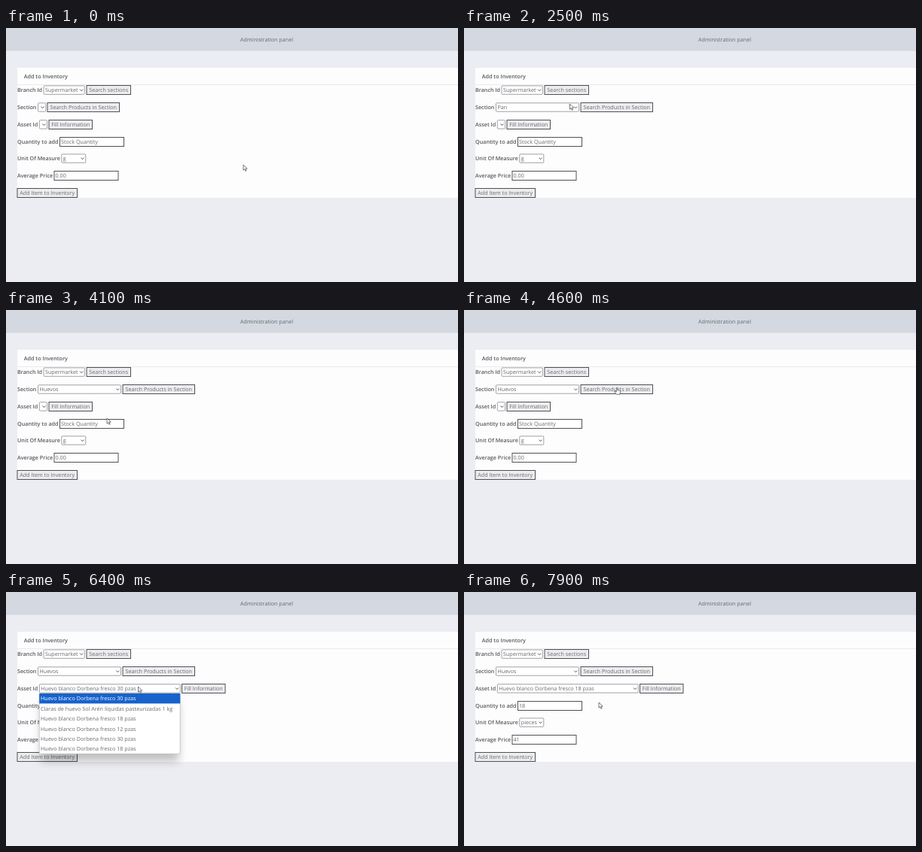
Animation, 600 px wide and 338 px high, one loop 8 s. Source, as an HTML page:

```html
<!DOCTYPE html>
<html lang="en">
<head>
<meta charset="utf-8">
<title>Administration panel</title>
<style>
  html, body { margin: 0; width: 100%; height: 100%; overflow: hidden; background: #ecedf2; }
  svg { display: block; width: 100vw; height: 100vh; }
  text { font: 7.2px "Open Sans", "Noto Sans", sans-serif; fill: #666a6e; text-rendering: geometricPrecision; white-space: pre; }
  .label { font-weight: 600; fill: #55595d; }
  .middle { text-anchor: middle; }
  .active { fill: #fff; }
</style>
</head>
<body>
<svg id="stage" viewBox="0 0 600 338"></svg>
<script>
const LOOP = 8000, STEP = 100;
const stage = document.getElementById('stage');

const eggs = n => `Huevo blanco Dorbena fresco ${n} pzas`;
const sections = ['Pan', 'Leche', 'Huevos', 'Frutas', 'Verduras', 'Carnes',
  'Pescados y Mariscos', 'Frutas y Verduras Congeladas'];
const assets = [eggs(30), 'Claras de huevo Sol Arén líquidas pasteurizadas 1 kg',
  eggs(18), eggs(12), eggs(30), eggs(18)];

// time, x, y of the pointer tip
const path = [
  [0, 315, 182], [900, 169, 90], [1200, 169, 90], [1400, 149, 81.5],
  [2200, 149, 81.5], [2500, 140.5, 101], [3600, 140.5, 101], [4000, 134, 144],
  [4100, 134, 144], [4400, 190, 112], [4600, 203, 103], [5400, 203, 103],
  [5800, 175.5, 126], [6500, 175.5, 126], [6900, 170, 152], [7000, 170, 152],
  [7100, 169.5, 154], [7500, 170, 166], [7600, 170, 166], [7900, 179, 147]
];
const popups = [
  { open: 2600, lit: 3000, close: 4100, x: 42.5, y: 111.7, w: 110, pitch: 13.5, items: sections },
  { open: 6000, lit: 6300, close: 7700, x: 44.2, y: 135, w: 187, pitch: 13.4, items: assets }
];
const between = (t, a, b) => t >= a && t < b;

function pointerAt(t) {
  const i = path.findIndex(key => key[0] > t);
  if (i < 0) return path[path.length - 1].slice(1);
  const [t0, x0, y0] = path[i - 1], [t1, x1, y1] = path[i];
  const p = (t - t0) / (t1 - t0), k = p * p * (3 - 2 * p);
  return [x0 + (x1 - x0) * k, y0 + (y1 - y0) * k];
}

const rect = (x, y, w, h, fill, extra = '') =>
  `<rect x="${x}" y="${y}" width="${w}" height="${h}" fill="${fill}" ${extra}/>`;
const text = (x, y, s, cls = '') => `<text x="${x}" y="${y}" class="${cls}">${s}</text>`;
const label = (y, s) => text(15, y, s, 'label');

function button(x, y, w, s, pressed) {
  return rect(x + .5, y + .5, w - 1, 12, pressed ? '#d0d0d7' : '#ededf0', 'stroke="#505154"')
    + text(x + w / 2, y + 9.1, s, 'middle');
}
function input(x, y, s) {
  return rect(x + .5, y + .5, 85, 12, '#fff', 'stroke="#505154"') + text(x + 2, y + 9.1, s);
}
function select(x, y, w, s) {
  return rect(x, y, w, 11.4, '#fff', 'rx="1" stroke="#8a8b90" stroke-width=".8"')
    + text(x + 2, y + 8.3, s)
    + `<path d="M${x + w - 6.2} ${y + 4.8}l2 2 2-2" fill="none" stroke="#3c3d40" stroke-width=".9"/>`;
}

function popup({ lit, x, y, w, pitch, items }, t, [px, py]) {
  const h = pitch * items.length;
  const inside = between(py, y, y + h) && between(px, x, x + w);
  const active = inside ? Math.floor((py - y) / pitch) : t >= lit ? 0 : -1;
  let out = rect(x + 2, y + 12, w - 4, h - 2, '#000', 'opacity=".24" filter="url(#soft)"')
    + rect(x, y, w, h, '#fff', 'rx="2" stroke="#b4b5b9" stroke-width=".7"');
  items.forEach((s, i) => {
    const top = y + i * pitch;
    if (i === active) out += rect(x, top, w, pitch, '#1762cb');
    out += text(x + 1.8, top + 9.4, s, i === active ? 'active' : '');
  });
  return out;
}

function pointer(t, [x, y]) {
  const hand = between(t, 1400, 2300) || between(t, 4500, 5500);
  const d = hand
    ? 'M-.8 .6q.8-1.2 1.6 0v3l2.8.6q1 .3.9 1.3l-.5 3.7h-4.6l-2.6-3.4q.2-1.2 1.3-.6l1.1.8z'
    : 'M0 0v7.2l1.7-1.5 1.2 2.6 1.2-.5-1.2-2.6h2.3z';
  return `<path transform="translate(${x} ${y})" d="${d}" fill="#fff" stroke="#3c3e42" stroke-width=".7" stroke-linejoin="round"/>`;
}

function scene(t) {
  const tip = pointerAt(t);
  const filled = t >= 7800;
  const section = t < 1900 ? '' : t < 4100 ? sections[0] : sections[2];
  const asset = t < 5200 ? '' : t < 7700 ? assets[0] : assets[2];
  const sectionWidth = section ? 110 : 10.3;
  const assetWidth = asset ? 187 : 10.3;
  return '<defs><filter id="soft" x="-20%" y="-30%" width="140%" height="160%"><feGaussianBlur stdDeviation="6"/></filter></defs>'
    + rect(0, 0, 600, 338, '#ecedf2')
    + rect(0, 0, 600, 30.5, '#d3d8e1')
    + text(346, 17.6, 'Administration panel', 'middle')
    + rect(15, 53, 585, 173, '#fdfdfe')
    + rect(15, 75, 585, .8, '#e6e7ea')
    + text(23.8, 66.5, 'Add to Inventory', 'label')
    + label(85.2, 'Branch Id')
    + select(50, 76.9, 54.3, 'Supermarket')
    + button(106.5, 76, 59.5, 'Search sections', between(t, 1600, 1700))
    + label(108.1, 'Section')
    + select(42.5, 99.8, sectionWidth, section)
    + button(section ? 154.5 : 54.5, 99, 96.5, 'Search Products in Section')
    + label(131, 'Asset Id')
    + select(44.3, 122.7, assetWidth, asset)
    + button(asset ? 233 : 56.5, 122, 58.5, 'Fill Information')
    + label(154.1, 'Quantity to add')
    + input(71, 145, filled ? '18' : 'Stock Quantity')
    + label(176.2, 'Unit Of Measure')
    + select(73.8, 167.9, 32, filled ? 'pieces' : 'g')
    + label(199.1, 'Average Price')
    + input(63.5, 190, filled ? '41' : '0.00')
    + button(14.5, 213, 80.5, 'Add Item to Inventory')
    + popups.filter(p => between(t, p.open, p.close)).map(p => popup(p, t, tip)).join('')
    + pointer(t, tip);
}

const start = performance.now();
let shown = -1;
function tick() {
  const t = Math.floor((performance.now() - start) % LOOP / STEP) * STEP;
  if (t !== shown) stage.innerHTML = scene(shown = t);
  requestAnimationFrame(tick);
}
tick();
</script>
</body>
</html>
```
